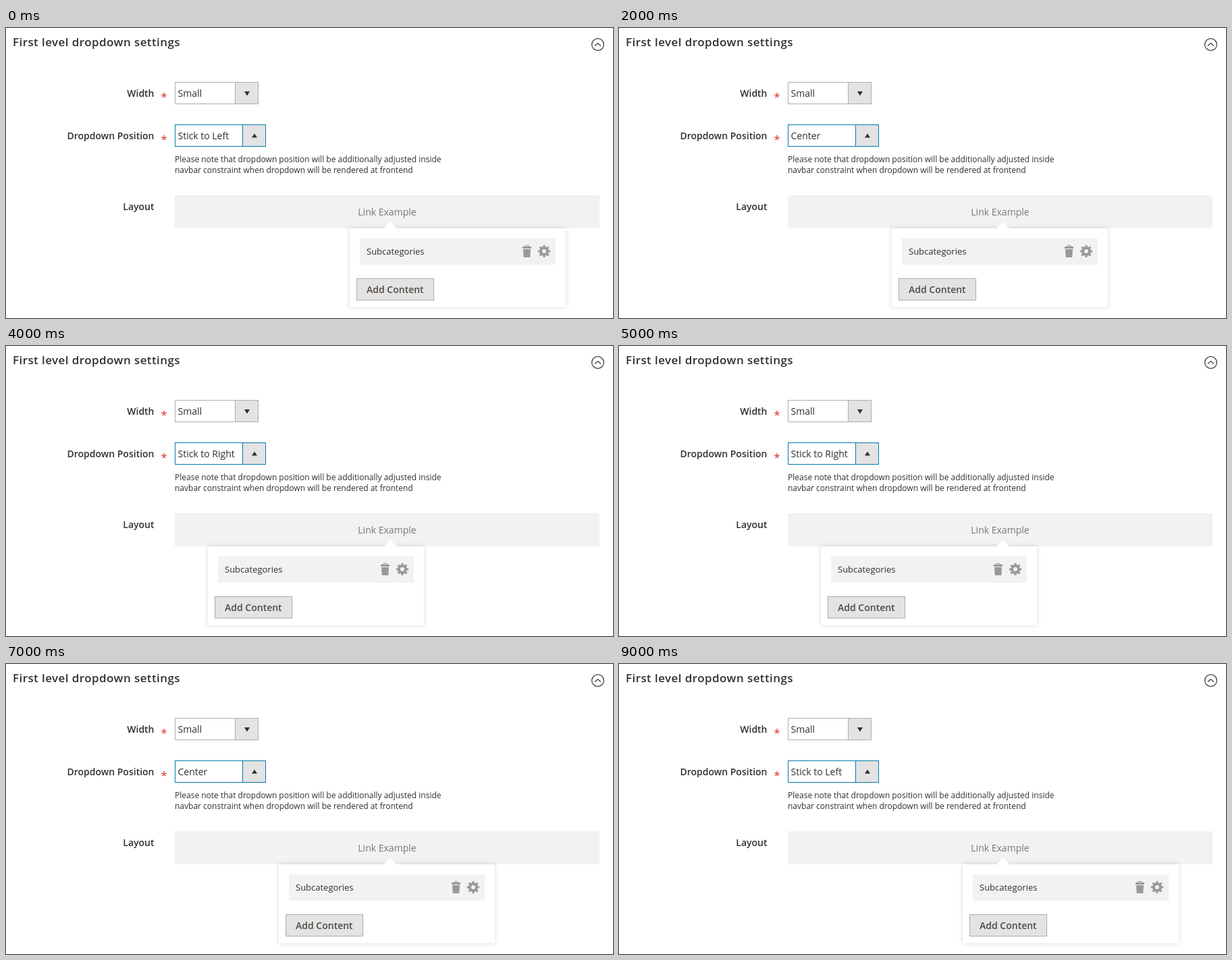
These frames come from a looping animation (899x430 px, 10000 ms). An HTML page:

```html
<!DOCTYPE html>
<html lang="en">
<head>
<meta charset="utf-8">
<title>Dropdown settings</title>
<style>
  html, body { margin: 0; width: 100%; height: 100%; overflow: hidden; background: #fff; }
  svg { display: block; font: 14px "Open Sans", sans-serif; fill: #303030; }
  .bold { font-weight: 600; }
  .label { font-weight: 600; text-anchor: end; }
  .title { font-size: 17px; font-weight: 600; letter-spacing: .025em; }
  .note { font-size: 12px; }
  .star { font-size: 16px; fill: #e22626; }
  .muted { fill: #777; text-anchor: middle; }
  .panel { fill: #f2f2f2; }
  .icon { fill: #999; }
  .white { fill: #fff; }
  .box { fill: #fff; stroke: #adadad; }
  .gray { fill: #e3e3e3; stroke: #adadad; }
  .active { stroke: #007aae; }
  .line { fill: none; stroke: #41362f; stroke-width: 1.2; }
  .ring { fill: none; stroke: #999; }
  #popup > .card { filter: drop-shadow(0 0 3px rgba(0, 0, 0, .16)); }
</style>
</head>
<body>
<svg width="899" height="430" viewBox="0 0 899 430">
  <text class="title" x="10" y="27">First level dropdown settings</text>
  <circle class="line" cx="876.5" cy="24.5" r="8.9"/>
  <path class="line" d="M872 26.5l4.5-4 4.5 4"/>

  <text class="label" x="219.5" y="102">Width</text>
  <text class="star" x="229.5" y="108">*</text>
  <rect class="box" x="250.5" y="80.5" width="123" height="32"/>
  <rect class="gray" x="339.5" y="80.5" width="34" height="32"/>
  <path d="M353 94h8l-4 6.500z"/>
  <text x="254.500" y="102">Small</text>

  <text class="label" x="219.5" y="165">Dropdown Position</text>
  <text class="star" x="229.5" y="171">*</text>
  <rect class="box active" x="250.5" y="143.5" width="134" height="32"/>
  <rect class="gray active" x="350.5" y="143.5" width="34" height="32"/>
  <path d="M364 162.500h8l-4-6z"/>
  <text id="position" x="254.500" y="165"></text>
  <text class="note" x="250" y="199">Please note that dropdown position will be additionally adjusted inside</text>
  <text class="note" x="250" y="215">navbar constraint when dropdown will be rendered at frontend</text>

  <text class="label" x="219.5" y="270">Layout</text>
  <rect class="panel" x="250" y="248" width="629" height="49"/>
  <text class="muted" x="564.5" y="278">Link Example</text>

  <g id="popup">
    <rect class="card white" y="297" width="320" height="117"/>
    <rect class="panel" x="15" y="312" width="290" height="39"/>
    <text x="25" y="336" font-size="13">Subcategories</text>
    <path class="icon" fill-rule="evenodd" d="M256 324h3.500v-2h6v2h3.500v3h-13zM260.500 323v1h4v-1zM257 328h11l-.7 12h-9.600z"/>
    <g transform="translate(288 331)">
      <circle class="ring" r="5" stroke-width="4"/>
      <circle class="ring" r="7.5" stroke-width="3.200" pathLength="16" stroke-dasharray="1" stroke-dashoffset=".5"/>
    </g>
    <rect class="gray" x="10.5" y="371.5" width="114" height="32"/>
    <text class="bold" x="25" y="393" fill="#514943">Add Content</text>
  </g>
  <path class="white" d="M559 297.500l10-10 10 10z"/>
</svg>
<script>
  const STEP = 1000;
  const left = { label: "Stick to Left", x: 509 };
  const center = { label: "Center", x: 404 };
  const right = { label: "Stick to Right", x: 299 };
  const timeline = [left, left, center, center, right, right, center, center, center, left];

  const position = document.getElementById("position");
  const popup = document.getElementById("popup");
  const start = performance.now();

  function draw() {
    const step = Math.floor((performance.now() - start) / STEP) % timeline.length;
    const { label, x } = timeline[step];
    position.textContent = label;
    popup.setAttribute("transform", `translate(${x} 0)`);
    requestAnimationFrame(draw);
  }
  draw();
</script>
</body>
</html>
```
